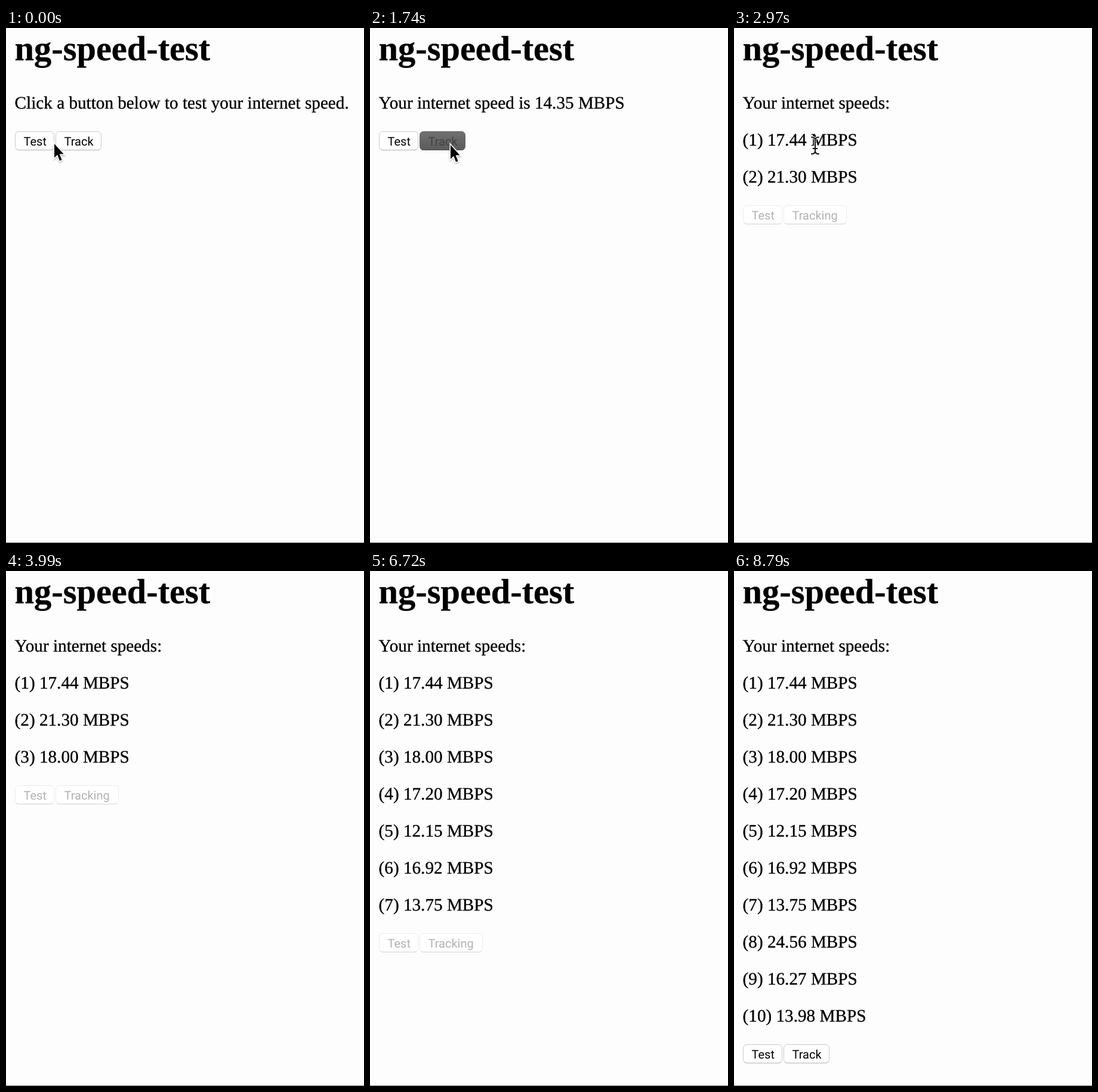
Animation, 600 px wide and 863 px high, one loop 8970 ms. Source, as an HTML page:

```html
<!DOCTYPE html>
<html lang="en">
<head>
<meta charset="utf-8">
<title>ng-speed-test</title>
<style>
  html, body { margin: 0; width: 100%; height: 100%; overflow: hidden; background: #fefdfe; }
  svg { display: block; width: 600px; height: 863px; text-rendering: geometricPrecision; }
  .serif { font: 29.2px "Liberation Serif", Times, serif; stroke: #000; stroke-width: .35px; }
  .title { font-size: 58.4px; font-weight: bold; }
  .button text { font: 20px Roboto, sans-serif; }
  .button rect { fill: #fff; stroke: #c9c8c9; }
  .button path { fill: none; stroke: #b3b2b3; }
  .button.disabled rect { stroke: #ececec; }
  .button.disabled path { stroke: #d2d2d2; }
  .button.disabled text { fill: #b2b1b2; }
  .button.pressed rect { fill: url(#press); stroke: #686768; }
  .button.pressed path { stroke: #585758; }
  .button.pressed text { fill: #434243; }
</style>
</head>
<body>
<svg viewBox="0 0 600 863">
  <defs>
    <linearGradient id="press" x2="0" y2="1">
      <stop stop-color="#727172"/>
      <stop offset="1" stop-color="#5c5b5c"/>
    </linearGradient>
    <filter id="shadow" x="-50%" y="-50%" width="200%" height="200%">
      <feDropShadow dx="0" dy="1.5" stdDeviation="1.3" flood-opacity=".35"/>
    </filter>
  </defs>
  <rect width="600" height="863" fill="#fefdfe"/>
  <rect y="862" width="600" height="1" fill="#7b7a7b"/>
  <text class="serif title" x="14.6" y="54">ng-speed-test</text>
  <text class="serif" id="message" x="14.6" y="135"></text>
  <g id="rows"></g>
  <g id="buttons"></g>
  <path id="arrow" d="M0 0V23.5L5.2 18.6L9 28.6L12.6 27L8.6 17.2H15.6Z" fill="#000"
        stroke="#fff" stroke-width="3" paint-order="stroke" filter="url(#shadow)"/>
  <g id="beam" fill="none" stroke-linecap="round">
    <path d="M-6-14Q0-14 0-9Q0-14 6-14M0-9V9M-6 14Q0 14 0 9Q0 14 6 14M-3.5 5H3.5" stroke="#fff" stroke-width="4"/>
    <path d="M-6-14Q0-14 0-9Q0-14 6-14M0-9V9M-6 14Q0 14 0 9Q0 14 6 14M-3.5 5H3.5" stroke="#111" stroke-width="2"/>
  </g>
</svg>
<script>
const LOOP = 8970;
const ROW_HEIGHT = 62;
const ING_WIDTH = 29;

const PRESS_TEST = 690, RELEASE_TEST = 810, RESULT = 1320;
const PRESS_TRACK = 1740, RELEASE_TRACK = 1860;

const speeds = [
  [2250, "17.44"], [2970, "21.30"], [3690, "18.00"], [4440, "17.20"], [5220, "12.15"],
  [5970, "16.92"], [6720, "13.75"], [7200, "24.56"], [7950, "16.27"], [8670, "13.98"]
];
const FIRST_ROW = speeds[0][0];
const DONE = speeds[speeds.length - 1][0];

// Pointer stops: time, x, y
const pointerPath = [
  [0, 81, 194], [300, 52, 197], [1380, 52, 197], [1500, 92, 212], [1680, 135, 196]
];

const $ = id => document.getElementById(id);
const within = (t, from, to) => t >= from && t < to;
const clamp = v => Math.min(1, Math.max(0, v));

function make(tag, parent, attrs = {}) {
  const node = document.createElementNS("http://www.w3.org/2000/svg", tag);
  for (const name in attrs) node.setAttribute(name, attrs[name]);
  return parent.appendChild(node);
}

const rows = speeds.map(([time, speed], i) => {
  const node = make("text", $("rows"), { class: "serif", x: 14.6, y: 135 + ROW_HEIGHT * (i + 1) });
  node.textContent = `(${i + 1}) ${speed} MBPS`;
  return { time, node };
});

function makeButton() {
  const group = make("g", $("buttons"));
  const box = make("rect", group, { y: 173.5, height: 31, rx: 6 });
  const edge = make("path", group);
  const label = make("text", group, { y: 197 });
  return (x, width, text, state) => {
    group.setAttribute("class", "button " + state);
    box.setAttribute("x", x);
    box.setAttribute("width", width);
    edge.setAttribute("d", `M${x + 2} 203Q${x + 3.5} 204.5 ${x + 6} 204.5H${x + width - 6}Q${x + width - 3.5} 204.5 ${x + width - 2} 203`);
    label.setAttribute("x", x + 14);
    label.textContent = text;
  };
}
const drawTest = makeButton();
const drawTrack = makeButton();

function pointerAt(t) {
  const next = pointerPath.findIndex(stop => stop[0] > t);
  if (next < 0) return pointerPath[pointerPath.length - 1].slice(1);
  const [t0, x0, y0] = pointerPath[next - 1];
  const [t1, x1, y1] = pointerPath[next];
  const p = (t - t0) / (t1 - t0);
  const k = p * p * (3 - 2 * p);
  return [x0 + (x1 - x0) * k, y0 + (y1 - y0) * k];
}

function messageAt(t) {
  if (t >= FIRST_ROW) return "Your internet speeds:";
  if (within(t, RESULT, RELEASE_TRACK)) return "Your internet speed is 14.35 MBPS";
  return "Click a button below to test your internet speed.";
}

function drawButtons(t, rowCount) {
  const testing = within(t, RELEASE_TEST, RESULT);
  const tracking = within(t, RELEASE_TRACK, DONE);
  const state = (from, to) =>
    testing || tracking ? "disabled" : within(t, from, to) ? "pressed" : "";
  const shift = testing ? ING_WIDTH : 0;
  drawTest(15.5, 65 + shift, testing ? "Testing" : "Test", state(PRESS_TEST, RELEASE_TEST));
  drawTrack(83.5 + shift, tracking ? 76 + ING_WIDTH : 76, tracking ? "Tracking" : "Track",
    state(PRESS_TRACK, RELEASE_TRACK));
  $("buttons").setAttribute("transform", `translate(0 ${rowCount * ROW_HEIGHT})`);
}

function draw(t) {
  $("message").textContent = messageAt(t);
  let rowCount = 0;
  for (const { time, node } of rows) {
    const shown = t >= time;
    node.setAttribute("visibility", shown ? "visible" : "hidden");
    rowCount += shown;
  }
  drawButtons(t, rowCount);

  const [x, y] = pointerAt(t);
  const overText = t >= FIRST_ROW;
  $("arrow").setAttribute("transform", `translate(${x} ${y})`);
  $("arrow").setAttribute("opacity", overText ? 0 : 1);
  $("beam").setAttribute("transform", `translate(${x + 1} ${y + 1})`);
  $("beam").setAttribute("opacity", overText ? 1 - clamp((t - 3420) / 210) : 0);
}

const start = performance.now();
function tick() {
  draw((performance.now() - start) % LOOP);
  requestAnimationFrame(tick);
}
tick();
</script>
</body>
</html>
```
